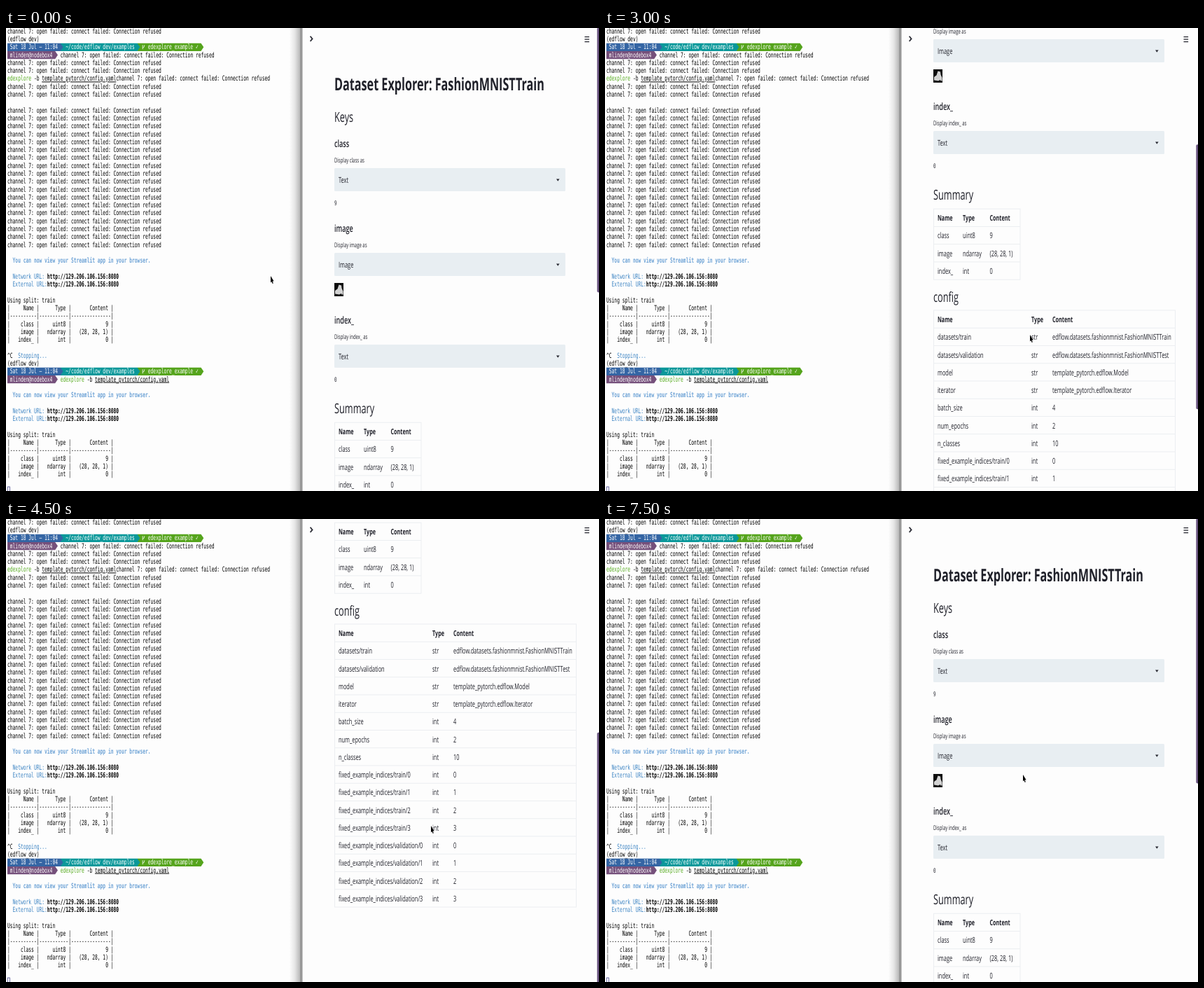
Recreate the animation shown at these times as an HTML page. Size 847 by 661 pixels, loop 8 s.

```html
<!DOCTYPE html>
<html lang="en">
<head>
<meta charset="utf-8">
<title>Dataset explorer</title>
<style>
  html, body { margin: 0; width: 100%; height: 100%; overflow: hidden; background: #fdfdfd; }
  svg { display: block; width: 847px; height: 661px; }
  text { white-space: pre; text-rendering: geometricPrecision; }
  .mono { font-family: "DejaVu Sans Mono", monospace; font-size: 10px; }
  .sans { font-family: "Open Sans", "Noto Sans", sans-serif; fill: #20212a; }
</style>
</head>
<body>
<svg viewBox="0 0 847 661">
  <defs>
    <linearGradient id="shade">
      <stop offset="0" stop-color="#fdfdfd"/>
      <stop offset=".5" stop-color="#e6e6e6"/>
      <stop offset="1" stop-color="#b8b8b8"/>
    </linearGradient>
  </defs>
  <g id="terminal"></g>
  <rect x="405" width="15" height="661" fill="url(#shade)"/>
  <rect x="420" width="3.5" height="661" fill="#989898"/>
  <g id="page"></g>
  <path d="M434.6 11.8l3 3.6l-3 3.6" fill="none" stroke="#262730" stroke-width="1.7"/>
  <path d="M826.5 12.7h6.6M826.5 16.2h6.6M826.5 19.7h6.6" stroke="#262730" stroke-width="1.3"/>
  <rect id="thumb" x="844.3" width="4" height="378" rx="2" fill="#6a5580"/>
  <path id="pointer" d="M0 0V9.6L1.5 8L2.6 11L3.8 10.4L2.7 7.4H4.6Z" stroke="#fff" stroke-width=".8" paint-order="stroke"/>
</svg>
<script>
const $ = id => document.getElementById(id);
const rect = (x, y, w, h, fill, extra = '') =>
  `<rect x="${x}" y="${y}" width="${w}" height="${h}" fill="${fill}" ${extra}/>`;

// Terminal: a character grid, squashed like the rest of the screen
const COL = 3.788, ROW = 11.293, LEFT = 2;
const colX = c => LEFT + c * COL;
const rowY = r => 4.7 + r * ROW;
const BLUE = '#3f86c4', SKY = '#6ea3d6', GREEN = '#58ac22';

function put(row, col, str, fill = '#000', extra = '') {
  return `<text class="mono" transform="translate(${colX(col)} ${rowY(row) + 3}) scale(.6292 1)" fill="${fill}" ${extra}>${str}</text>`;
}

function segment(row, from, to, fill) {
  const a = colX(from), b = colX(to), y = rowY(row) - ROW / 2;
  return `<path d="M${a} ${y}H${b}l${COL} ${ROW / 2}l${-COL} ${ROW / 2}H${a}Z" fill="${fill}"/>`;
}

const error = 'channel 7: open failed: connect failed: Connection refused';
const bold = 'font-weight="bold"', underline = 'text-decoration="underline"';
const cells = (n, t, c) => `|${n.padStart(9)} |${t.padStart(10)} |${c.padStart(14)} |`;
const summary = [['Name', 'Type', 'Content'], ['class', 'uint8', '9'],
  ['image', 'ndarray', '(28, 28, 1)'], ['index_', 'int', '0']];

function command(row, col) {
  return put(row, col, 'edexplore', GREEN) + put(row, col + 10, '-b') +
    put(row, col + 13, 'template_pytorch/config.yaml', '#000', underline);
}

function prompt(row) {
  const y = rowY(row), x = colX(51);
  return segment(row, 49, 73, '#55a41c') + segment(row, 20, 49, '#0a989a') +
    segment(row, 0, 20, '#3465a4') + segment(row + 1, 0, 18, '#75507b') +
    put(row - 1, 0, '(edflow_dev)') +
    put(row, 1, 'Sat 18 Jul – 11:04', '#fff') +
    put(row, 22, '~/code/edflow_dev/examples', '#fff') +
    put(row, 53, 'edexplore_example ✓', '#fff') +
    `<path d="M${x} ${y - 3}v6M${x} ${y + 1}q2.6 0 2.6 -4" fill="none" stroke="#fff" stroke-width=".8"/>` +
    put(row + 1, 1, 'mlinden@nodebox4', '#fff');
}

function report(row) {
  const url = (r, kind) => put(r, 2, kind + ' URL:', BLUE) +
    put(r, 15, 'http://129.206.106.156:8080', '#000', bold);
  const lines = summary.map(r => cells(...r));
  lines.splice(1, 0, '|' + [10, 11, 15].map(n => '-'.repeat(n)).join('|') + '|');
  return put(row, 2, 'You can now view your Streamlit app in your browser.', SKY, bold) +
    url(row + 2, 'Network') + url(row + 3, 'External') +
    put(row + 5, 0, 'Using split: train') +
    lines.map((line, i) => put(row + 6 + i, 0, line)).join('');
}

let term = prompt(2) + put(3, 20, error) + command(6, 0) + put(6, 41, error);
for (let r = 0; r < 28; r++) {
  if (![1, 2, 3, 6, 9].includes(r)) term += put(r, 0, error);
}
term += report(29) + put(41, 0, '^C') + put(41, 4, 'Stopping...', BLUE) +
  prompt(43) + command(44, 20) + report(46) +
  rect(2.4, 655, 3, 8, 'none', 'stroke="#4b4b90" stroke-width=".8"');
$('terminal').innerHTML = term;

// Web page: y is the middle of the capitals
function label(x, y, str, size = 11.4, weight = 500) {
  return `<text class="sans" transform="translate(${x} ${y + size * .36}) scale(.65 1)" font-size="${size}" font-weight="${weight}">${str}</text>`;
}

function field(y, name, kind) {
  return label(469, y, name, 14, 600) +
    label(469, y + 24, `Display ${name} as`, 9.2) +
    rect(469, y + 35, 330, 33, '#e8eef2', 'rx="1.5"') +
    label(475, y + 52, kind) +
    `<path d="M786 ${y + 50.5}h4.6l-2.3 3.2z" fill="#262730"/>`;
}

function value(y, str) {
  return `<text class="mono" transform="translate(469 ${y + 3.2}) scale(.65 1)" fill="#262730" style="font-size:9px">${str}</text>`;
}

function table(top, width, xs, rows) {
  const pitch = 25.25, line = '#eceef1';
  return rect(469.5, top, width, pitch * rows.length, 'none', `stroke="${line}"`) +
    rows.map((row, i) => {
      const y = top + i * pitch;
      return (i ? rect(469.5, y - .5, width, 1, line) : '') +
        row.map((s, j) => label(xs[j], y + 12.9, s, i ? 11.4 : 11.1, i ? 500 : 700)).join('');
    }).join('');
}

const config = [['Name', 'Type', 'Content'],
  ['datasets/train', 'str', 'edflow.datasets.fashionmnist.FashionMNISTTrain'],
  ['datasets/validation', 'str', 'edflow.datasets.fashionmnist.FashionMNISTTest'],
  ['model', 'str', 'template_pytorch.edflow.Model'],
  ['iterator', 'str', 'template_pytorch.edflow.Iterator'],
  ['batch_size', 'int', '4'], ['num_epochs', 'int', '2'], ['n_classes', 'int', '10']];
for (const split of ['train', 'validation']) {
  for (let i = 0; i < 4; i++) config.push([`fixed_example_indices/${split}/${i}`, 'int', `${i}`]);
}

$('page').innerHTML =
  label(469, 80.3, 'Dataset Explorer: FashionMNISTTrain', 24.9, 700) +
  label(469, 127.3, 'Keys', 19.6) +
  field(165, 'class', 'Text') + value(250, '9') +
  field(286, 'image', 'Image') +
  rect(469, 364, 13, 19, '#0c0c0c') +
  '<path d="M470 379.5V375l3.5-2.5l2-6l3.5 1l.5 4l2 4.5v4.5h-2l-.5-1.5l-3 1.5z" fill="#d2d2d2"/>' +
  field(417, 'index_', 'Text') + value(502, '0') +
  label(469, 543.3, 'Summary', 19.6) +
  table(563.2, 123.5, [475, 511, 549.5], summary) +
  label(469, 688.8, 'config', 19.6) +
  table(708, 345, [475, 609, 639], config);

const scrolls = [[0, 0], [6, 305], [7, 423.6], [8, 544.5], [9, 558], [12, 12], [13, 0]];
const points = [[0, [378, 354]], [2, [260, 420]], [3, [125, 485]], [4, [80, 515]],
  [5, [607, 438]], [15, [597, 365]]];
const held = (keys, step) => keys.findLast(k => k[0] <= step)[1];

function draw(now) {
  const step = Math.floor(now % 8000 / 500);
  const y = held(scrolls, step);
  $('page').setAttribute('transform', `translate(0 ${-y})`);
  $('thumb').setAttribute('y', y * .547 - .5);
  $('pointer').setAttribute('transform', `translate(${held(points, step)})`);
  requestAnimationFrame(draw);
}
draw(performance.now());
</script>
</body>
</html>
```
